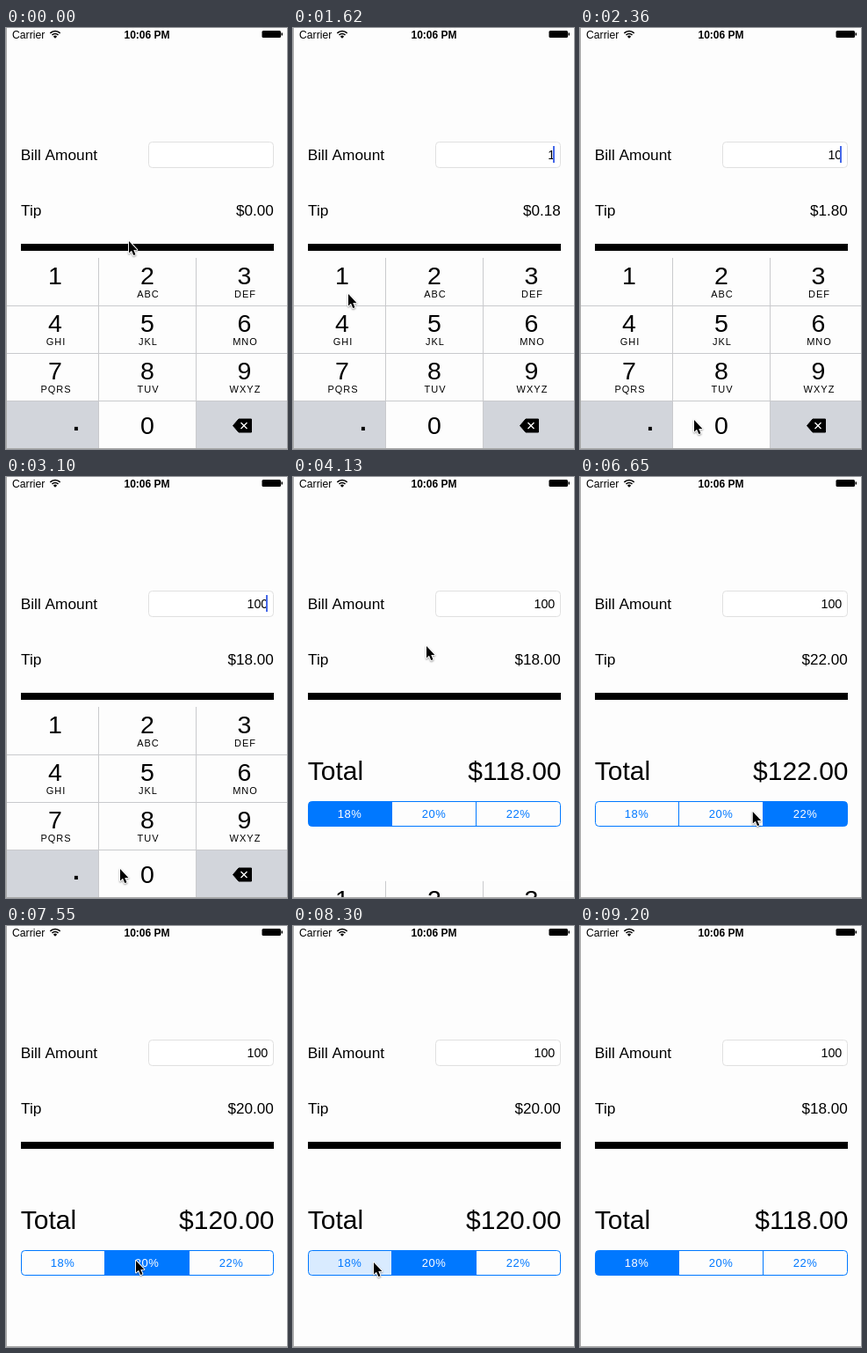
These frames come from a looping animation (320x478 px, 9500 ms). An HTML page with a canvas:

```html
<!DOCTYPE html>
<html lang="en">
<head>
<meta charset="utf-8">
<title>Tip calculator</title>
<style>
  html, body { margin: 0; width: 100%; height: 100%; overflow: hidden; background: #fdfdfd; }
  canvas { display: block; width: 320px; height: 478px; }
</style>
</head>
<body>
<canvas id="stage" width="320" height="478"></canvas>
<script>
const ctx = document.getElementById('stage').getContext('2d');
const LOOP = 9500, STEP = 148.33, PHASE = 122;
const PRESS = 150, DISMISS = 3690, SLIDE = 535, KEYBOARD_HEIGHT = 217;
const FONT = '"Liberation Sans", Arial, sans-serif';
const PAPER = '#fdfdfd', BLUE = '#0078ff', PRESSED = '#d9ebff', GREY = '#d2d5db', LINE = '#c9cacd';
const RATES = [18, 20, 22];

// Each tap takes effect on release.
const KEY_TAPS = [
  { release: 1600, key: '1' }, { release: 2340, key: '0' }, { release: 3080, key: '0' }
];
const RATE_TAPS = [
  { release: 5450, index: 1 }, { release: 6330, index: 2 },
  { release: 7220, index: 1 }, { release: 8420, index: 0 }
];
const POINTER_START = { x: 140, y: 242 };
const POINTER_MOVES = [
  { from: 150, to: 900, x: 76, y: 343 },
  { from: 900, to: 1300, x: 63, y: 302 },
  { from: 1650, to: 2190, x: 130, y: 445 },
  { from: 3100, to: 3680, x: 152, y: 192 },
  { from: 4270, to: 5160, x: 148, y: 380 },
  { from: 5450, to: 6180, x: 250, y: 380 },
  { from: 6350, to: 6930, x: 148, y: 380 },
  { from: 7560, to: 8130, x: 92, y: 382 },
  { from: 8600, to: 9160, x: 112, y: 484 }
];

function ease(t, from, to) {
  const k = Math.min(1, Math.max(0, (t - from) / (to - from)));
  return k * k * (3 - 2 * k);
}

const released = (taps, t) => taps.filter(tap => tap.release <= t);
const pressed = (taps, t) => taps.find(tap => t < tap.release && t >= tap.release - PRESS);

function stateAt(t) {
  const bill = released(KEY_TAPS, t).map(tap => tap.key).join('');
  const selected = released(RATE_TAPS, t).pop()?.index ?? 0;
  const tip = bill * RATES[selected] / 100;
  const pointer = { ...POINTER_START };
  for (const move of POINTER_MOVES) {
    const k = ease(t, move.from, move.to);
    pointer.x += (move.x - pointer.x) * k;
    pointer.y += (move.y - pointer.y) * k;
  }
  return {
    bill, selected, tip, pointer,
    total: Number(bill) + tip,
    keyDown: pressed(KEY_TAPS, t)?.key,
    touched: pressed(RATE_TAPS, t)?.index,
    caret: t < DISMISS && (bill !== '' || Math.floor(t / 585) % 2 === 1),
    slide: KEYBOARD_HEIGHT * ease(t, DISMISS, DISMISS + SLIDE)
  };
}

function rect(x, y, w, h, color) {
  ctx.fillStyle = color;
  ctx.fillRect(x, y, w, h);
}

function text(str, x, y, size, { align = 'left', color = '#000', weight = 'normal', spacing = 0 } = {}) {
  ctx.font = `${weight} ${size}px ${FONT}`;
  ctx.letterSpacing = spacing + 'px';
  ctx.textAlign = align;
  ctx.fillStyle = color;
  ctx.fillText(str, x, y);
}

function roundRect(x, y, w, h, r) {
  ctx.beginPath();
  ctx.roundRect(x, y, w, h, r);
}

function stroke(color, width) {
  ctx.strokeStyle = color;
  ctx.lineWidth = width;
  ctx.stroke();
}

function drawStatusBar() {
  text('Carrier', 7, 12, 12.2);
  for (const r of [8, 5]) {
    ctx.beginPath();
    ctx.arc(56, 11.5, r, -Math.PI * 0.75, -Math.PI * 0.25);
    stroke('#000', 1.6);
  }
  ctx.beginPath();
  ctx.moveTo(56, 11.8);
  ctx.arc(56, 11.8, 3, -Math.PI * 0.75, -Math.PI * 0.25);
  ctx.fill();
  text('10:06 PM', 160.5, 12, 12, { align: 'center', weight: 'bold' });
  roundRect(291.5, 3, 21.5, 8, 1.5);
  ctx.fill();
  rect(313.5, 5.5, 1.5, 3, '#000');
}

function drawForm({ bill, tip, total, caret }) {
  const right = { align: 'right' };
  text('Bill Amount', 16.7, 149.5, 17.3);
  roundRect(162.5, 129.5, 142, 29, 4);
  ctx.fillStyle = '#fff';
  ctx.fill();
  stroke('#e0e0e0', 1);
  text(bill, 298.3, 149, 14.3, right);
  if (caret) rect(296, 134, 2, 19, '#4668e8');

  text('Tip', 17, 212.5, 17.3);
  text('$' + tip.toFixed(2), 304.7, 212.5, 17.1, right);
  rect(17, 245, 288, 8, '#000');
  text('Total', 16.8, 343.5, 30);
  text('$' + total.toFixed(2), 305.5, 343.5, 30, right);
}

function drawSegments({ selected, touched }) {
  ctx.save();
  roundRect(17.5, 368.5, 287, 28, 4);
  ctx.clip();
  RATES.forEach((rate, i) => {
    const x = 17 + i * 96, active = i === selected;
    rect(x, 368, 96, 29, active ? BLUE : i === touched ? PRESSED : PAPER);
    text(rate + '%', x + 47.5, 387, 13, { align: 'center', color: active ? '#fff' : BLUE, spacing: 0.5 });
  });
  for (const x of [112, 208]) rect(x, 368, 1, 29, BLUE);
  ctx.restore();
  roundRect(17.5, 368.5, 287, 28, 4);
  stroke(BLUE, 1);
}

function drawBackspace() {
  ctx.fillStyle = '#000';
  ctx.lineJoin = 'round';
  const body = new Path2D('M258.5 451.5L265 444H279.5V459H265Z');
  ctx.fill(body);
  ctx.strokeStyle = '#000';
  ctx.lineWidth = 1;
  ctx.stroke(body);
  ctx.strokeStyle = '#fff';
  ctx.lineWidth = 1.3;
  ctx.stroke(new Path2D('M267.5 448l7 7m0-7l-7 7'));
}

function drawKeyboard({ slide, keyDown }) {
  const letters = ['', 'ABC', 'DEF', 'GHI', 'JKL', 'MNO', 'PQRS', 'TUV', 'WXYZ'];
  const edges = [1, 106, 217, 320], centers = [56, 161, 271.5];
  ctx.save();
  ctx.translate(0, slide);
  rect(1, 261, 319, KEYBOARD_HEIGHT, PAPER);
  [...'123456789.0', 'back'].forEach((key, i) => {
    const col = i % 3, y = 261 + Math.floor(i / 3) * 54;
    const isSide = key === '.' || key === 'back';
    if (isSide || key === keyDown) rect(edges[col], y, edges[col + 1] - edges[col], 54, GREY);
    if (isSide) return;
    text(key, centers[col], y + (key === '0' ? 38 : 30), 28.5, { align: 'center' });
    if (letters[i]) text(letters[i], centers[col] + 1, y + 45, 11, { align: 'center', spacing: 1 });
  });
  for (const y of [315, 369, 423]) rect(1, y, 319, 1, LINE);
  for (const x of [105, 216]) rect(x, 261, 1, 216, LINE);
  text('.', 80, 457, 28, { align: 'center', weight: 'bold' });
  drawBackspace();
  ctx.restore();
}

function drawWindowEdge() {
  rect(0, 0, 1, 478, '#a9a9a9');
  rect(0, 477, 320, 1, '#a9a9a9');
}

function drawPointer({ pointer }) {
  const arrow = new Path2D('M0 0V14L3.2 11L5.6 16.6L8 15.6L5.6 10.2H10Z');
  ctx.save();
  ctx.translate(pointer.x, pointer.y);
  ctx.scale(0.94, 0.97);
  ctx.lineJoin = 'round';
  ctx.lineWidth = 2;
  ctx.strokeStyle = '#fff';
  ctx.shadowColor = 'rgba(0, 0, 0, 0.4)';
  ctx.shadowBlur = 2;
  ctx.shadowOffsetY = 1;
  ctx.stroke(arrow);
  ctx.shadowColor = 'transparent';
  ctx.fillStyle = '#000';
  ctx.fill(arrow);
  ctx.restore();
}

function draw(t) {
  const state = stateAt(t);
  rect(0, 0, 320, 478, PAPER);
  drawStatusBar();
  drawForm(state);
  drawSegments(state);
  drawKeyboard(state);
  drawWindowEdge();
  drawPointer(state);
}

// The screen refreshes in coarse, even steps.
const stepped = t => Math.max(0, PHASE + Math.floor((t - PHASE) / STEP) * STEP);

const origin = performance.now();
function tick() {
  draw(stepped((performance.now() - origin) % LOOP));
  requestAnimationFrame(tick);
}
tick();
</script>
</body>
</html>
```
